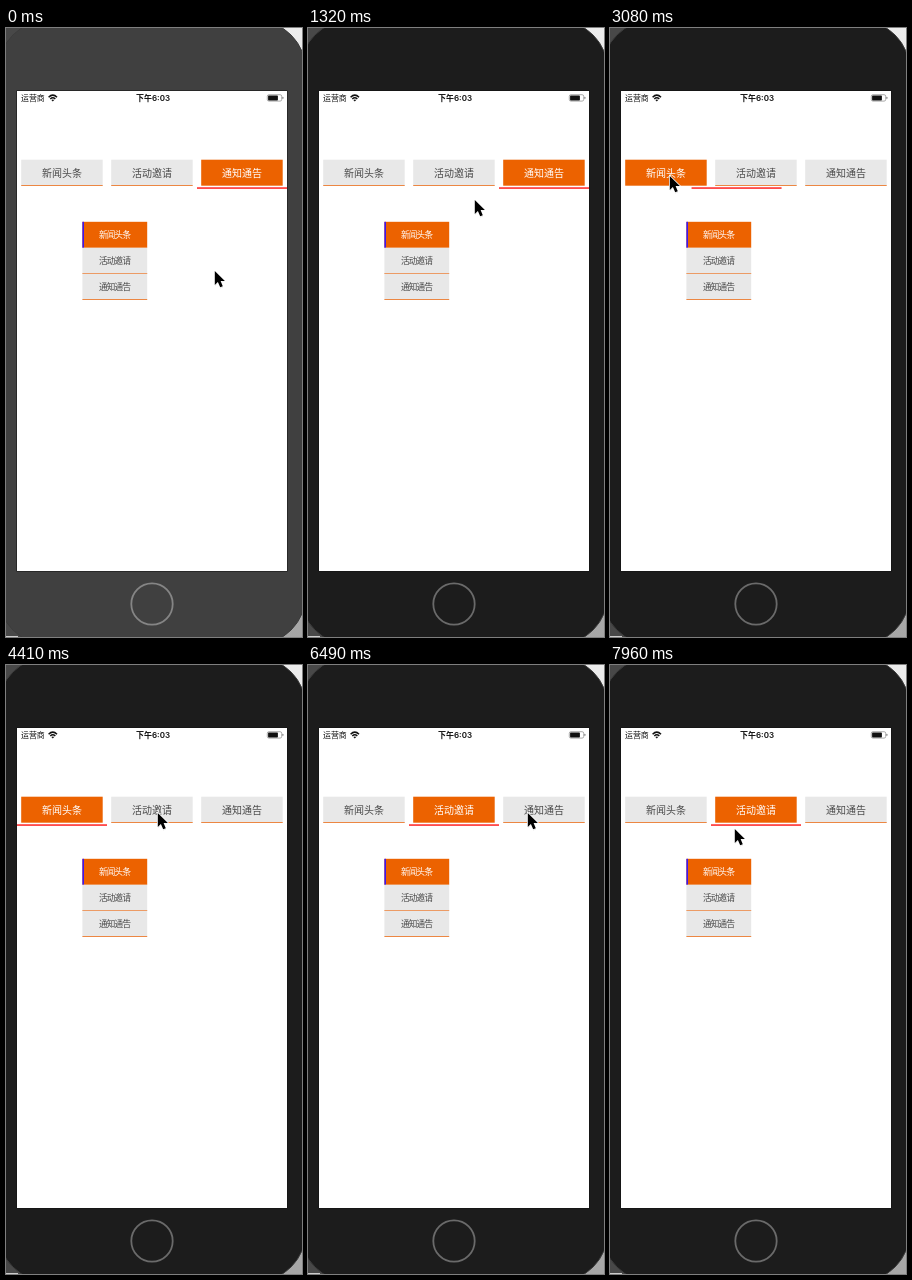
Animation, 296 px wide and 609 px high, one loop 8 s. Source, as an HTML page:

```html
<!DOCTYPE html>
<html lang="zh-CN">
<head>
<meta charset="utf-8">
<title>Tab bar demo</title>
<style>
  html, body { margin: 0; width: 296px; height: 609px; overflow: hidden; background: #fff; }
  svg { display: block; }
  text { font-family: "Noto Sans CJK SC", "Noto Sans CJK", sans-serif; }
</style>
</head>
<body>
<svg width="296" height="609" viewBox="0 0 296 609">
  <linearGradient id="backdrop" x2="0" y2="1">
    <stop stop-color="#ececec"/>
    <stop offset="1" stop-color="#a6a6a6"/>
  </linearGradient>
  <rect width="148" height="609" fill="#484848"/>
  <rect x="148" width="148" height="609" fill="url(#backdrop)"/>
  <rect id="bezel" x="-8" y="-8" width="308" height="625" rx="51" stroke="#3c3c3c"/>
  <rect y="608" width="12" height="1" fill="#ccc"/>
  <circle id="home" cx="146" cy="576" r="20.7" fill="none" stroke-width="1.8"/>
  <rect x="10.5" y="62.5" width="271" height="481" fill="#111"/>
  <rect x="11" y="63" width="270" height="480" fill="#fff"/>

  <g fill="#111">
    <text x="15" y="73" font-size="7.9">运营商</text>
    <text x="147" y="73" font-size="8" font-weight="600" text-anchor="middle"
      style="font-family: Inter, 'Noto Sans CJK SC', 'Noto Sans CJK', sans-serif">下午6:03</text>
    <path d="M42.6 69.2Q46.8 65 51 69.2M44.3 71Q46.8 68.6 49.3 71" fill="none" stroke="#111" stroke-width="1.5"/>
    <path d="M45.4 72.1Q46.8 70.9 48.2 72.1L46.8 73.6Z"/>
    <rect x="261.3" y="66.7" width="14.4" height="6.4" rx="1.6" fill="none" stroke="#888" stroke-width=".7"/>
    <rect x="262.1" y="67.4" width="9.8" height="5" rx=".7"/>
    <rect x="276.4" y="68.8" width="1" height="2.2" rx=".5" fill="#888"/>
  </g>

  <g id="tabs"></g>
  <g id="list"></g>
  <rect id="line" y="159.4" width="90" height="1.3" fill="#f00"/>
  <g id="cursor">
    <path d="M1 2V16L4 13.2L6.3 18.4L9 17.2L6.8 12H11Z" opacity=".15"/>
    <path d="M.8 1V14.9L3.9 12L6.2 17.3L8.8 16.2L6.6 11H10.9Z" stroke="#fff" stroke-width="1.5" paint-order="stroke"/>
  </g>
</svg>
<script>
const DURATION = 8000, FRAME = 147;
const ORANGE = '#ec6200', PLAIN = '#e8e8e8', INK = '#484848', PRESSED = '#a0a0a0', EDGE = '#ec7c30';
const TAB_STEP = 90, SLIDE_FRAMES = 2, FIRST_TAB = 2;
const labels = ['新闻头条', '活动邀请', '通知通告'];
const $ = id => document.getElementById(id);

function set(el, attrs) {
  for (const key in attrs) el.setAttribute(key, attrs[key]);
}
function add(parent, name, attrs, text = '') {
  const el = document.createElementNS('http://www.w3.org/2000/svg', name);
  set(el, attrs);
  el.textContent = text;
  return parent.appendChild(el);
}

const tabs = labels.map((label, i) => {
  const x = 15.2 + TAB_STEP * i, width = 81.5;
  return {
    box: add($('tabs'), 'rect', { x, y: 131.7, width, height: 26 }),
    edge: add($('tabs'), 'rect', { x, y: 157, width, height: 0.9, fill: EDGE }),
    text: add($('tabs'), 'text', { x: 56 + TAB_STEP * i, y: 148.6, 'font-size': 10, 'text-anchor': 'middle' }, label)
  };
});

labels.forEach((label, i) => {
  const x = 76.4, y = 193.8 + 26 * i, width = 64.8, on = i === 0;
  add($('list'), 'rect', { x, y, width, height: 26, fill: on ? ORANGE : PLAIN });
  add($('list'), 'rect', on
    ? { x, y, width: 1.6, height: 26, fill: '#3c18f0' }
    : { x, y: y + 25.2, width, height: 0.9, fill: EDGE });
  add($('list'), 'text', { x: 93, y: y + 16.4, 'font-size': 8.6, 'letter-spacing': -0.8,
    fill: on ? '#fff' : INK }, label);
});

// Times below count screen captures
const taps = [
  { tab: 1, down: 11, up: 13.55 },
  { tab: 0, down: 20, up: 20.4 },
  { tab: 1, down: 33, up: 33.05 }
];
const moves = [
  { from: 0, to: 3, x: 206, y: 241 },
  { from: 4, to: 11, x: 150, y: 143 },
  { from: 15, to: 21, x: 59, y: 147 },
  { from: 21, to: 27, x: 149, y: 147, bowY: 10 },
  { from: 29, to: 30, x: 151, y: 147 },
  { from: 37, to: 41, x: 226, y: 143 },
  { from: 43, to: 44, x: 219, y: 147 },
  { from: 44, to: 47, x: 212, y: 336 },
  { from: 49, to: 54, x: 124, y: 163, bowX: -50 }
];

const clamp = u => Math.min(1, Math.max(0, u));
const ease = u => u * u * (3 - 2 * u);
const mix = (a, b, u) => a + (b - a) * u;
const gray = level => `rgb(${level},${level},${level})`;

function pointer(frame) {
  let x = 208, y = 242;
  for (const move of moves) {
    const u = clamp((frame - move.from) / (move.to - move.from));
    const bow = Math.sin(Math.PI * u);
    x = mix(x, move.x, u) + bow * (move.bowX || 0);
    y = mix(y, move.y, u) + bow * (move.bowY || 0);
  }
  return [x, y];
}

function draw(time) {
  const frame = Math.floor((time + 10) / FRAME);
  let selected = FIRST_TAB, slide = FIRST_TAB, pressed = -1;
  for (const { tab, down, up } of taps) {
    if (frame >= up) selected = tab;
    else if (frame >= down) pressed = tab;
    slide = mix(slide, tab, ease(clamp((frame - up) / SLIDE_FRAMES)));
  }
  tabs.forEach(({ box, edge, text }, i) => {
    const on = i === selected;
    set(box, { fill: on ? ORANGE : PLAIN });
    set(edge, { opacity: on ? 0 : 1 });
    set(text, { fill: on ? '#fff' : i === pressed ? PRESSED : INK });
  });
  const dim = clamp(frame / 2);
  set($('bezel'), { fill: gray(mix(64, 28, dim)) });
  set($('home'), { stroke: gray(mix(133, 106, dim)) });
  set($('line'), { x: 11 + TAB_STEP * slide });
  set($('cursor'), { transform: `translate(${pointer(frame)})` });
}

const began = performance.now();
function tick() {
  draw((performance.now() - began) % DURATION);
  requestAnimationFrame(tick);
}
tick();
</script>
</body>
</html>
```
